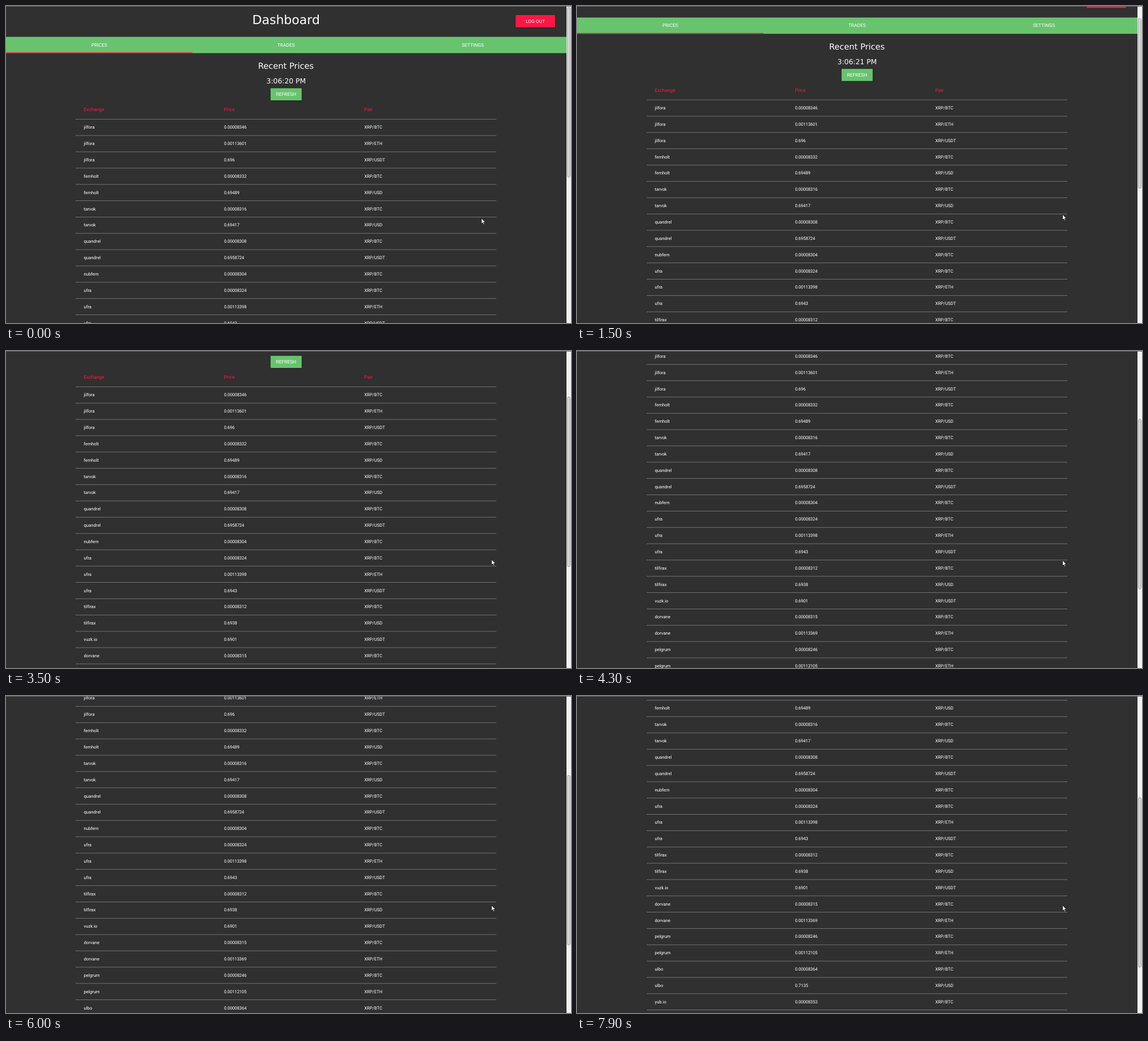
An HTML page that plays this animation: 999 px wide and 561 px high, repeating every 8000 ms.

```html
<!DOCTYPE html>
<html lang="en">
<head>
<meta charset="utf-8">
<title>Dashboard</title>
<style>
  html, body { margin: 0; height: 100%; overflow: hidden; background: #303030; }
  svg { display: block; width: 999px; height: 561px; }
  text { font: 8.41px Roboto, sans-serif; fill: #fff; text-rendering: geometricPrecision; white-space: pre; }
  .heading { font-family: "DejaVu Sans", sans-serif; text-anchor: middle; }
  .label { text-anchor: middle; }
  .head { fill: #ff1744; }
  .cell { font-size: 7.8px; letter-spacing: -.06px; }
  .price { letter-spacing: -.16px; }
  .button { filter: drop-shadow(0 .8px 1.4px rgba(0, 0, 0, .35)); }
</style>
</head>
<body>
<svg viewBox="0 0 999 561">
  <rect width="999" height="561" fill="#303030"/>
  <g id="page">
    <text class="heading" x="495.2" y="32.2" style="font-size:22px">Dashboard</text>
    <rect class="button" x="901" y="16.1" width="69.8" height="21.7" rx="1.2" fill="#ff1744"/>
    <text class="label" x="936" y="29.5">LOG OUT</text>
    <rect y="54.6" width="991" height="28.8" fill="#68c36f"/>
    <rect y="82" width="329.8" height="1.4" fill="#ff1744"/>
    <text class="label" x="165" y="71.5">PRICES</text>
    <text class="label" x="495.2" y="71.5">TRADES</text>
    <text class="label" x="825.5" y="71.5">SETTINGS</text>
    <text class="heading" x="495" y="111.3" style="font-size:14.6px">Recent Prices</text>
    <text class="heading" id="clock" x="495.4" y="137" style="font-size:12.35px"></text>
    <rect class="button" x="467.8" y="145.4" width="55" height="21.6" rx="1.2" fill="#68c36f"/>
    <text class="label" x="495.3" y="159.2">REFRESH</text>
  </g>
  <rect width="999" height="1" fill="#686868"/>
  <rect x="991" y="1" width="8" height="560" fill="#f2f2f2"/>
  <rect id="thumb" x="992.5" y="2.5" width="5" height="300.5" rx="2.5" fill="#d4d4d4" stroke="#a3a3a3"/>
  <path id="cursor" d="M0 0V9.6L2.3 7.5L3.9 11L5.5 10.3L3.9 6.9H7Z" fill="#fff" stroke="#151515" stroke-width=".8"/>
</svg>
<script>
const LOOP = 8000, STEP = 100, ROW = 28.85, NOTCH = 34.25;
const COLUMNS = [137.5, 385.4, 633.4];

// exchange: price pair, price pair, ...
const quotes = `jilfora: 0.00008346 BTC, 0.00113601 ETH, 0.696 USDT
fernholt: 0.00008332 BTC, 0.69489 USD
tarvok: 0.00008316 BTC, 0.69417 USD
quandrel: 0.00008308 BTC, 0.6958724 USDT
nubfern: 0.00008304 BTC
ufra: 0.00008324 BTC, 0.00113398 ETH, 0.6943 USDT
tilfirax: 0.00008312 BTC, 0.6938 USD
vuzk.io: 0.6901 USDT
dorvane: 0.00008315 BTC, 0.00113369 ETH
pelgrum: 0.00008246 BTC, 0.00112105 ETH
ulbo: 0.00008364 BTC, 0.7135 USD
yub.io: 0.00008353 BTC`;

// wheel turns: start, duration, notches
const turns = [
  [1110, 400, 1], [1710, 400, 1], [2637, 400, 1], [3050, 400, 1],
  [3840, 440, 2], [5440, 520, 1], [6440, 440, 1], [7510, 400, 1]
];

const $ = id => document.getElementById(id);
const page = $('page'), clock = $('clock'), thumb = $('thumb'), cursor = $('cursor');

function add(tag, attributes, content = '') {
  const node = document.createElementNS('http://www.w3.org/2000/svg', tag);
  for (const name in attributes) node.setAttribute(name, attributes[name]);
  node.textContent = content;
  page.append(node);
}

function addLine(row) {
  add('rect', { x: 123, y: 199.9 + row * ROW, width: 744, height: .9, fill: '#7a7a7a' });
}

function buildTable() {
  ['Exchange', 'Price', 'Pair'].forEach((name, i) =>
    add('text', { class: 'head', x: COLUMNS[i], y: 186 }, name));
  addLine(0);
  let row = 0;
  for (const line of quotes.split('\n')) {
    const [exchange, list] = line.split(': ');
    for (const quote of list.split(', ')) {
      const [price, coin] = quote.split(' ');
      [exchange, price, 'XRP/' + coin].forEach((value, i) =>
        add('text', { class: i === 1 ? 'cell price' : 'cell', x: COLUMNS[i], y: 217.3 + row * ROW }, value));
      addLine(++row);
    }
  }
}

const clamp = x => Math.min(1, Math.max(0, x));

// cubic-bezier(.25, 0, .6, 1)
function ease(x) {
  x = clamp(x);
  let low = 0, high = 1;
  for (let i = 0; i < 20; i++) {
    const s = (low + high) / 2, r = 1 - s;
    if (.75 * s * r * r + 1.8 * s * s * r + s ** 3 < x) low = s; else high = s;
  }
  return low * low * (3 - 2 * low);
}

function draw(now) {
  const t = Math.floor(now % LOOP / STEP) * STEP;
  const scroll = NOTCH * turns.reduce((sum, [start, length, notches]) =>
    sum + notches * ease((t - start) / length), 0);
  page.setAttribute('transform', `translate(0 ${-scroll})`);
  thumb.setAttribute('transform', `translate(0 ${scroll * .575})`);
  clock.textContent = `3:06:${20 + Math.floor(t / 1000)} PM`;
  const move = clamp(t / 400), nudge = clamp((t - 3800) / 300);
  cursor.setAttribute('transform',
    `translate(${840.7 + 17.8 * move} ${375.8 - 6.8 * move + 1.6 * nudge})`);
  requestAnimationFrame(draw);
}

buildTable();
requestAnimationFrame(draw);
</script>
</body>
</html>
```
